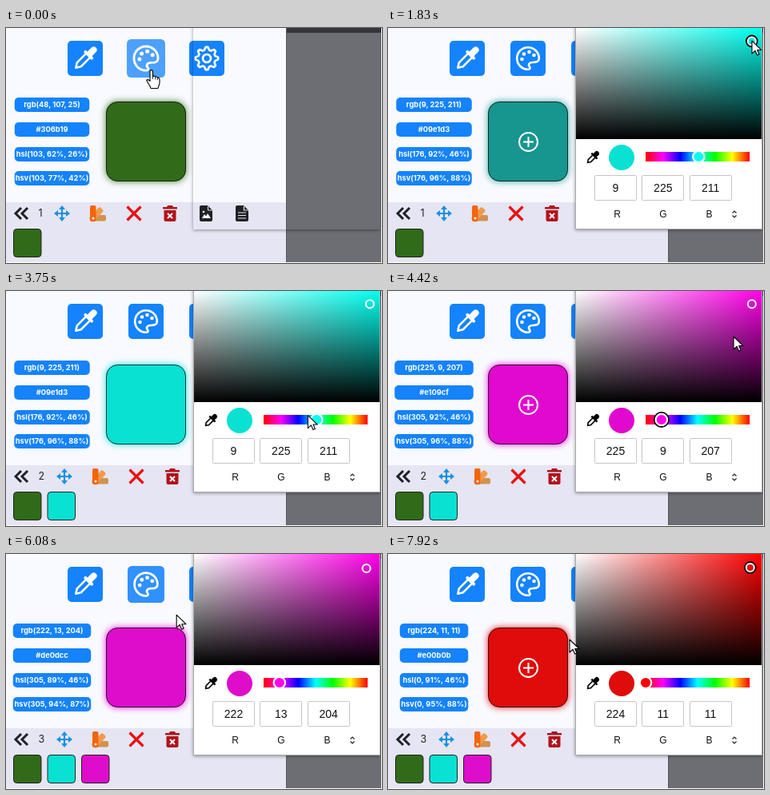
Write an HTML page that moves like this. It is 470 px wide and 294 px high and loops after 8 s.

```html
<!DOCTYPE html>
<html lang="en">
<head>
<meta charset="utf-8">
<title>Colour picker</title>
<style>
  html, body { margin: 0; width: 100%; height: 100%; overflow: hidden; background: #6d6e73; }
  svg { display: block; width: 100%; height: 100%; }
  text { text-anchor: middle; }
  .ui { font-family: Inter, "Open Sans", sans-serif; font-feature-settings: "cv11"; }
  #labels rect { fill: #1483fd; }
  #labels text { font-size: 9.3px; font-weight: 700; fill: #fff; }
  #saved text { font-size: 10.3px; font-weight: 500; fill: #18181c; }
  #count { font-size: 12.5px; text-anchor: start; fill: #222; }
  .button { fill: #1483fd; }
  .line { fill: none; stroke: #fff; stroke-width: 2.6; stroke-linejoin: round; stroke-linecap: round; }
  .white { fill: #fff; }
  .dark { fill: #202126; }
  .field { fill: #fff; stroke: #c6c6c6; }
  #picker text { font-family: "Liberation Sans", Arial, sans-serif; font-size: 14px; fill: #111; }
  #picker .channel { font-size: 12px; }
  .focus { fill: none; stroke: #000; stroke-width: 2; }
  .chip { stroke: #222; }
  .pointer { fill: #fff; stroke: #000; stroke-width: 1.1; stroke-linejoin: round; }
</style>
</head>
<body>
<svg viewBox="0 0 470 294" xmlns="http://www.w3.org/2000/svg">
  <defs>
    <linearGradient id="toWhite"><stop stop-color="#fff"/><stop offset="1" stop-color="#fff" stop-opacity="0"/></linearGradient>
    <linearGradient id="toBlack" x2="0" y2="1"><stop stop-opacity="0"/><stop offset="1"/></linearGradient>
    <linearGradient id="rainbow"></linearGradient>
    <filter id="glowBlur" x="-20%" y="-20%" width="140%" height="140%"><feGaussianBlur stdDeviation="4"/></filter>
    <filter id="edgeBlur" x="-5%" y="-5%" width="110%" height="110%"><feGaussianBlur stdDeviation="2"/></filter>
    <clipPath id="aroundPicker"><path clip-rule="evenodd" d="M0 0H470V294H0ZM234 0V252H468V0Z"/></clipPath>
  </defs>

  <rect width="470" height="294" fill="#6d6e73"/>
  <rect x="350" width="120" height="6" fill="#35363a"/>
  <rect width="350" height="294" fill="#f9faff"/>
  <rect y="218" width="350" height="76" fill="#e6e5f3"/>
  <path d="M350.5 0V294" stroke="#55565a"/>

  <g transform="translate(99 38)">
    <rect class="button" x="-22" y="-22" width="44" height="44" rx="5"/>
    <g transform="rotate(45)">
      <rect class="white" x="-4" y="-19" width="8" height="14" rx="4"/>
      <rect class="white" x="-7.5" y="-8" width="15" height="4" rx="2"/>
      <path class="line" stroke-width="2.200" d="M-3.500 -4V11L0 16.500L3.500 11V-4"/>
    </g>
  </g>
  <g id="palette">
    <rect class="button" x="-22" y="-22" width="44" height="44" rx="5"/>
    <path class="line" d="M0 13.800A13.800 13.800 0 1 1 13.800 0C13.800 4 11 5 6 5C1 5 0 8 2 10.500C3.500 12.500 2 13.800 0 13.800Z"/>
    <g class="white"><circle cx="-7.500" cy="1" r="2.300"/><circle cx="-5" cy="-5.500" r="2.300"/><circle cx="1.500" cy="-8" r="2.300"/><circle cx="7.500" cy="-4" r="2.300"/></g>
  </g>
  <g transform="translate(251 38)">
    <rect class="button" x="-22" y="-22" width="44" height="44" rx="5"/>
    <path id="gear" class="line"/>
    <circle class="line" r="5"/>
  </g>

  <g id="labels" class="ui"></g>
  <g id="saved" class="ui"><text x="290" y="136">Saved and Copied</text><text id="savedHex" x="290" y="150"></text></g>

  <rect id="glow" x="125" y="92" width="100" height="100" rx="14" filter="url(#glowBlur)"/>
  <rect id="swatch" stroke="#000" stroke-opacity=".78"/>
  <g id="plus" fill="none" stroke="#fff" stroke-width="2">
    <circle cx="175.5" cy="142.500" r="11.500"/><path d="M169 142.500H182M175.500 136V149"/>
  </g>

  <path d="M19 225L12 232L19 239M27 225L20 232L27 239" fill="none" stroke="#202126" stroke-width="3"/>
  <text id="count" class="ui" y="236" x="40.500"></text>
  <g id="tools">
    <g transform="translate(70 232)" fill="#1a90e2">
      <path d="M-7 0H7M0 -7V7" stroke="#1a90e2" stroke-width="2.200"/>
      <path id="moveTip" d="M0 -10L4 -5H-4Z"/>
      <use href="#moveTip" transform="rotate(90)"/><use href="#moveTip" transform="rotate(180)"/><use href="#moveTip" transform="rotate(270)"/>
    </g>
    <g transform="translate(115 232)">
      <rect x="-10" y="-10" width="7.500" height="20" rx="2" fill="#d0924f" transform="rotate(90 -6 6)"/>
      <rect x="-10" y="-10" width="7.500" height="20" rx="2" fill="#f09a4c" transform="rotate(42 -6 6)"/>
      <rect x="-10" y="-10" width="7.500" height="20" rx="2" fill="#f4640c"/>
      <circle cx="-6" cy="6" r="1.500" fill="#fff"/>
    </g>
    <path d="M151.500 223.500L168.500 240.500M168.500 223.500L151.500 240.500" stroke="#e8100f" stroke-width="3.200"/>
    <g transform="translate(205 232)">
      <path d="M-9 -8H-4L-3 -10H3L4 -8H9V-5.500H-9ZM-7.500 -4H7.500V8Q7.500 10 5.500 10H-5.500Q-7.500 10 -7.500 8Z" fill="#b2131b"/>
      <path d="M-3 0L3 6M3 0L-3 6" stroke="#fff" stroke-width="2"/>
    </g>
    <g transform="translate(250 232)">
      <path id="sheet" class="dark" d="M-6 -10H2L8 -4V8Q8 10 6 10H-6Q-8 10 -8 8V-8Q-8 -10 -6 -10Z"/>
      <path d="M2.500 -9V-4H8" fill="none" stroke="#e6e5f3"/>
      <path class="white" d="M-5 6L-2 1L0 3.500L2 0L6 6Z"/><circle class="white" cx="-3" cy="-2" r="1.300"/>
    </g>
    <g transform="translate(295 232)">
      <use href="#sheet"/>
      <path d="M2.500 -9V-4H8M-5 -1H5M-5 2.500H5M-5 6H5" fill="none" stroke="#e6e5f3" stroke-width="1.200"/>
    </g>
  </g>
  <g id="chips"></g>

  <g id="edge" clip-path="url(#aroundPicker)">
    <rect x="234" y="-8" width="234" height="261" fill-opacity=".4" filter="url(#edgeBlur)"/>
  </g>
  <g id="picker">
    <rect x="234.500" y="-1" width="233" height="252.500" fill="#fff" stroke="#a9a9ab"/>
    <rect id="field" x="235" width="232" height="139"/>
    <rect x="235" width="232" height="139" fill="url(#toWhite)"/>
    <rect x="235" width="232" height="139" fill="url(#toBlack)"/>
    <g id="fieldKnob"><circle class="focus" r="6.800"/><circle r="5" fill="none" stroke="#fff" stroke-width="2"/></g>
    <g transform="translate(256 162) rotate(45)">
      <rect x="-3" y="-10" width="6" height="8" rx="3"/><rect x="-5" y="-4" width="10" height="2.500"/>
      <path d="M-2.200 -2V6L0 9L2.200 6V-2" fill="none" stroke="#000" stroke-width="1.600"/>
    </g>
    <circle id="preview" cx="292" cy="162" r="16"/>
    <rect x="322" y="155" width="130" height="12" fill="url(#rainbow)"/>
    <g id="hueKnob"><circle class="focus" r="9"/><circle id="hueDot" r="7.200" stroke="#fff" stroke-width="2.200"/></g>
    <g id="fields"></g>
    <path d="M430.500 231.500L433 229L435.500 231.500M430.500 234.500L433 237L435.500 234.500" fill="none" stroke="#222" stroke-width="1.200"/>
  </g>

  <g id="cursor">
    <path id="arrow" class="pointer" d="M0 0V16L4 12.300L6.500 18L9 17L6.600 11.500H11.800Z"/>
    <g id="hand">
      <path class="pointer" d="M-2 1.500C-2 -1 1.500 -1 1.500 1.500V8C2.500 6.500 4.500 7 4.700 8.500C5.500 7.500 7.300 8 7.500 9.500C9 8.500 10 10 10 11.500V15C10 19 8.500 19 8 22.500H-1C-1.500 19.500 -4 17 -5.800 13.500C-6.800 11.500 -4.500 10.500 -2 13.500Z"/>
      <path d="M1.500 8V11M4.700 9V11.500M7.500 10V12" stroke="#000" stroke-width=".8" fill="none"/>
    </g>
  </g>
  <path d="M469.500 0V294M0 293.500H470" stroke="#fff"/>
</svg>

<script>
const LOOP = 8000, STEP = 1000 / 12;
const $ = id => document.getElementById(id);
const make = (parent, tag, attrs) => {
  const el = document.createElementNS('http://www.w3.org/2000/svg', tag);
  set(el, attrs);
  return parent.appendChild(el);
};
const set = (el, attrs) => { for (const k in attrs) el.setAttribute(k, attrs[k]); };
const show = (el, on) => { el.style.display = on ? '' : 'none'; };
const move = (el, x, y, scale = 1) => set(el, { transform: `translate(${x} ${y}) scale(${scale})` });

// Each key is [time, ...values]; values ease between keys.
const cursorKeys = [
  [0, 182, 53], [160, 182, 53], [750, 415, 161], [900, 415, 161], [1083, 389, 159],
  [1200, 388, 160], [1500, 411, 80], [1840, 455, 16], [1950, 455, 16], [2400, 191, 132],
  [2800, 191, 132], [3340, 179, 62], [3420, 179, 54], [3560, 179, 54], [3780, 388, 161],
  [3830, 388, 161], [4060, 342, 160], [4160, 342, 160], [4416, 432, 57], [4600, 455, 16],
  [4680, 455, 16], [4790, 450, 19], [5140, 173, 131], [5500, 173, 131], [5760, 179, 54],
  [5930, 179, 54], [6450, 342, 160], [6667, 342, 160], [6750, 330, 157], [6950, 322, 159],
  [7080, 322, 159], [7350, 450, 20], [7500, 453, 18], [7560, 453, 18], [7916, 227, 107]
];
const hueKeys = [[0, 103.2], [900, 103.2], [1083, 176.2], [3830, 176.2], [4060, 305.1], [6667, 305.1], [6750, 341.9], [6950, 360]];
const toneKeys = [
  [0, .7664, .4196], [1500, .7664, .4196], [1840, .96, .8824], [4680, .96, .8824],
  [4790, .9414, .8706], [7350, .9414, .8706], [7500, .951, .8784]
];
const within = (t, spans) => spans.some(([a, b]) => t >= a && t < b);
const openSpans = [[0, 2410], [3570, 5160], [5910, LOOP]];
const unsavedSpans = [[910, 2490], [3840, 5160], [6700, LOOP]];
const savedSpans = [[2490, 3490], [5160, 6160]];
const fieldFocus = [[1500, 2410], [4590, 5160], [7340, LOOP]];
const hueFocus = [[740, 1500], [3780, 4590], [6450, 7340]];

function track(keys, t) {
  const i = keys.findIndex(k => k[0] > t);
  if (i < 0) return keys[keys.length - 1].slice(1);
  if (i === 0) return keys[0].slice(1);
  const a = keys[i - 1], b = keys[i];
  const p = (t - a[0]) / (b[0] - a[0]), e = p * p * (3 - 2 * p);
  return a.slice(1).map((v, j) => v + (b[j + 1] - v) * e);
}

function hsvToRgb(h, s, v) {
  const channel = n => {
    const k = (n + h / 60) % 6;
    return Math.round(255 * (v - v * s * Math.max(0, Math.min(k, 4 - k, 1))));
  };
  return [channel(5), channel(3), channel(1)];
}
const hsvAt = t => [track(hueKeys, t)[0], ...track(toneKeys, t)];
const rgbAt = t => hsvToRgb(...hsvAt(t));
const css = rgb => `rgb(${rgb.join(', ')})`;
const hex = rgb => '#' + rgb.map(c => c.toString(16).padStart(2, '0')).join('');
const percent = x => Math.round(x * 100) + '%';

function names([h, s, v], rgb) {
  const l = v * (1 - s / 2), sl = (v - l) / Math.min(l, 1 - l), deg = Math.round(h) % 360;
  return [css(rgb), hex(rgb), `hsl(${deg}, ${percent(sl)}, ${percent(l)})`, `hsv(${deg}, ${percent(s)}, ${percent(v)})`];
}

const near = (x, y, cx, cy, r) => Math.abs(x - cx) <= r && Math.abs(y - cy) <= r;
const overPalette = t => near(...track(cursorKeys, t), 175, 38, 22);
const overSwatch = t => near(...track(cursorKeys, t), 175, 142, 50);
const recent = (fn, t, n) => {
  let sum = 0;
  for (let i = 0; i < n; i++) sum += fn(Math.max(0, t - i * STEP));
  return sum / n;
};

// Static parts built by rule
['#f00', '#f0f', '#00f', '#0ff', '#0f0', '#ff0', '#f00'].forEach((c, i) =>
  make($('rainbow'), 'stop', { offset: i / 6, 'stop-color': c }));
const gearPoints = Array.from({ length: 32 }, (_, i) => {
  const r = i % 4 < 2 ? 14.2 : 10.8, a = (i - .5) * Math.PI / 16 - Math.PI / 2;
  return `${r * Math.cos(a)} ${r * Math.sin(a)}`;
});
set($('gear'), { d: `M${gearPoints.join('L')}Z` });
const labels = [96, 127, 158, 188].map(y => ({
  box: make($('labels'), 'rect', { y: y - 9, height: 18, rx: 5 }),
  text: make($('labels'), 'text', { x: 57.5, y: y + 3.3 })
}));
const inputs = ['R', 'G', 'B'].map((name, i) => {
  const x = 258.5 + i * 59.3;
  make($('fields'), 'rect', { class: 'field', x: Math.floor(x) + .5, y: 184.5, width: 52, height: 31, rx: 1 });
  make($('fields'), 'text', { class: 'channel', x: 286.5 + i * 57.5, y: 237 }).textContent = name;
  return make($('fields'), 'text', { x: x + 26, y: 205 });
});
const chips = [0, 2500, 5200].map((t, i) => make($('chips'), 'rect', {
  class: 'chip', x: 9.5 + i * 42.5, y: 251.5, width: 34.5, height: 35, rx: 4, fill: css(rgbAt(t))
}));

function draw(t) {
  const hsv = hsvAt(t), [h, s, v] = hsv, rgb = rgbAt(t), color = css(rgb);
  const texts = names(hsv, rgb);
  const width = 53 + [...texts[3].replace(/\D/g, '')].reduce((w, d) => w + ({ 1: 3.5, 7: 5.5 }[d] || 6.5), 0);
  labels.forEach(({ box, text }, i) => {
    set(box, { x: 57.5 - width / 2, width });
    text.textContent = texts[i];
  });

  const hover = recent(overPalette, t, 2);
  move($('palette'), 175, 38, 1 + .09 * hover);
  set($('palette'), { opacity: 1 - .25 * hover });

  // The swatch trails the picked colour.
  const trail = [0, 1, 2].map(c => Math.round(recent(u => rgbAt(u)[c], Math.max(0, t - STEP), 4)));
  const grow = recent(overSwatch, t, 3), size = 99 + 15 * grow;
  set($('swatch'), { x: 175 - size / 2, y: 142 - size / 2, width: size, height: size, rx: 14 - 9 * grow, fill: css(trail) });
  set($('glow'), { fill: css(trail), opacity: .85 * (1 - grow) });
  show($('plus'), within(t, unsavedSpans));

  const count = t < 2490 ? 1 : t < 5160 ? 2 : 3;
  $('count').textContent = count;
  move($('tools'), count > 1 ? 3 : 0, 0);
  chips.forEach((chip, i) => show(chip, i < count));
  show($('saved'), within(t, savedSpans));
  $('savedHex').textContent = texts[1];

  const open = within(t, openSpans);
  show($('edge'), open);
  show($('picker'), open && t > 50 && within(t - STEP, openSpans));
  const pure = `hsl(${h} 100% 50%)`;
  set($('field'), { fill: pure });
  set($('hueDot'), { fill: pure });
  set($('preview'), { fill: color });
  move($('fieldKnob'), 234 + 230 * s, 139 * (1 - v));
  move($('hueKnob'), 452 - h * 130 / 360, 161);
  show($('fieldKnob').firstElementChild, within(t, fieldFocus));
  show($('hueKnob').firstElementChild, within(t, hueFocus));
  inputs.forEach((el, i) => { el.textContent = rgb[i]; });

  const hand = overPalette(t) || overSwatch(t);
  move($('cursor'), ...track(cursorKeys, t));
  show($('hand'), hand);
  show($('arrow'), !hand);
}

const start = performance.now();
function tick() {
  const t = (performance.now() - start) % LOOP;
  draw(Math.floor((t + 4) / STEP) % 96 * STEP);
  requestAnimationFrame(tick);
}
tick();
</script>
</body>
</html>
```
